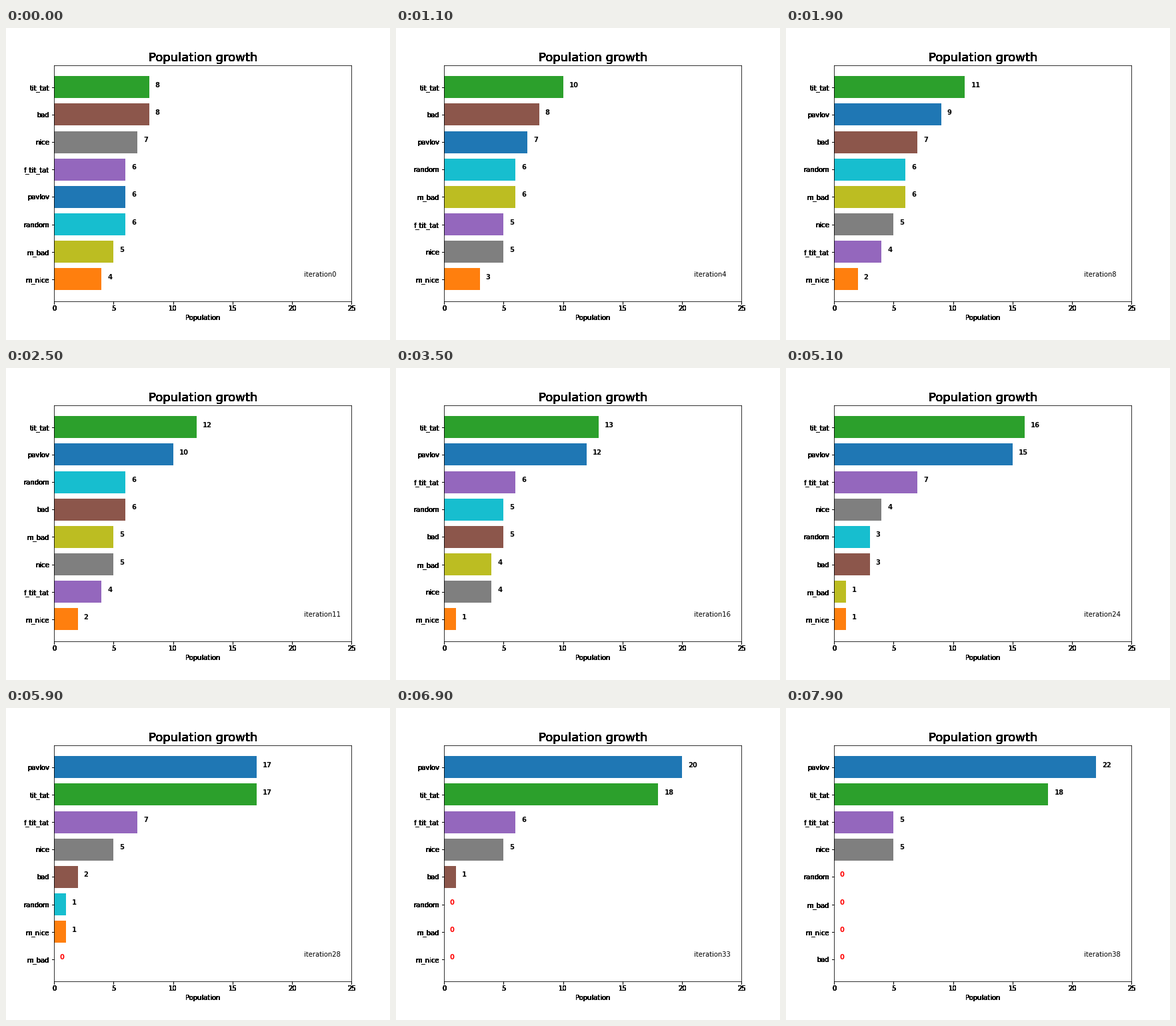
Animation of 576x468 px, one loop 8000 ms. Source, as a matplotlib script:

```python
import matplotlib.pyplot as plt
from matplotlib.animation import FuncAnimation
from matplotlib.artist import Artist

plt.rcParams["font.family"] = "DejaVu Sans"

# key: (name, colour, starting count); the order settles ties
SPECIES = {
    "f": ("f_tit_tat", "tab:purple", 6),
    "p": ("pavlov", "tab:blue", 6),
    "t": ("tit_tat", "tab:green", 8),
    "r": ("random", "tab:cyan", 6),
    "B": ("m_bad", "tab:olive", 5),
    "N": ("m_nice", "tab:orange", 4),
    "b": ("bad", "tab:brown", 8),
    "n": ("nice", "tab:gray", 7),
}

# one birth and one death per iteration, "-" for none
BIRTHS = "tptB" "pt-pt-p" "fptfp" "tptp" "pft-pntp" "pptp-p-p--"
DEATHS = "nfnN" "Nb-fb-B" "bNrnB" "bBbB" "rrB-brBr" "frbN-f-b--"

TICK = 100
FRAMES = 80
HOLD = 500
STEP = 200


class Ink(Artist):
    """Redraws the lettering around the plot until its edges are solid."""

    def draw(self, renderer):
        ax = self.axes
        parts = [ax.title, ax.xaxis.label,
                 *ax.get_xticklabels(), *ax.get_yticklabels(),
                 *ax.get_xticklines(), *ax.get_yticklines()]
        for part in parts:
            for _ in range(12):
                part.draw(renderer)


def counts_at(iteration):
    counts = {key: start for key, (_, _, start) in SPECIES.items()}
    for born, died in zip(BIRTHS[:iteration], DEATHS[:iteration]):
        if born != "-":
            counts[born] += 1
            counts[died] -= 1
    return counts


fig, ax = plt.subplots(figsize=(8, 6.5), dpi=72, facecolor="white")
fig.subplots_adjust(left=0.125, right=0.9, bottom=0.125, top=0.88)
rows = range(len(SPECIES))
bars = ax.barh(rows, [0] * len(SPECIES))
values = [ax.text(0, y, "", size=10, weight="bold") for y in rows]
counter = ax.text(21, 0.1, "", size=10)
ax.set(xlim=(0, 25), ylim=(-0.79, 7.79), xticks=range(0, 26, 5))
ax.set_title("Population growth", size=18)
ax.set_xlabel("Population", size=10)
ax.add_artist(Ink()).set_zorder(10)


def update(frame):
    time = frame * TICK
    iteration = 0 if time < HOLD else (time - HOLD) // STEP + 1
    counts = counts_at(iteration)
    ranking = sorted(SPECIES, key=lambda key: -counts[key])[::-1]
    for key, bar, value in zip(ranking, bars, values):
        n = counts[key]
        bar.set_width(n)
        bar.set_facecolor(SPECIES[key][1])
        value.set_text(str(n))
        value.set_x(n + 0.5)
        value.set_color("black" if n else "red")
    ax.set_yticks(rows, [SPECIES[key][0] for key in ranking])
    counter.set_text(f"iteration{iteration}")
    return [*bars, *values, counter]


anim = FuncAnimation(fig, update, frames=FRAMES, interval=TICK,
                     init_func=lambda: update(0), repeat=True, repeat_delay=0)
plt.show()
```
